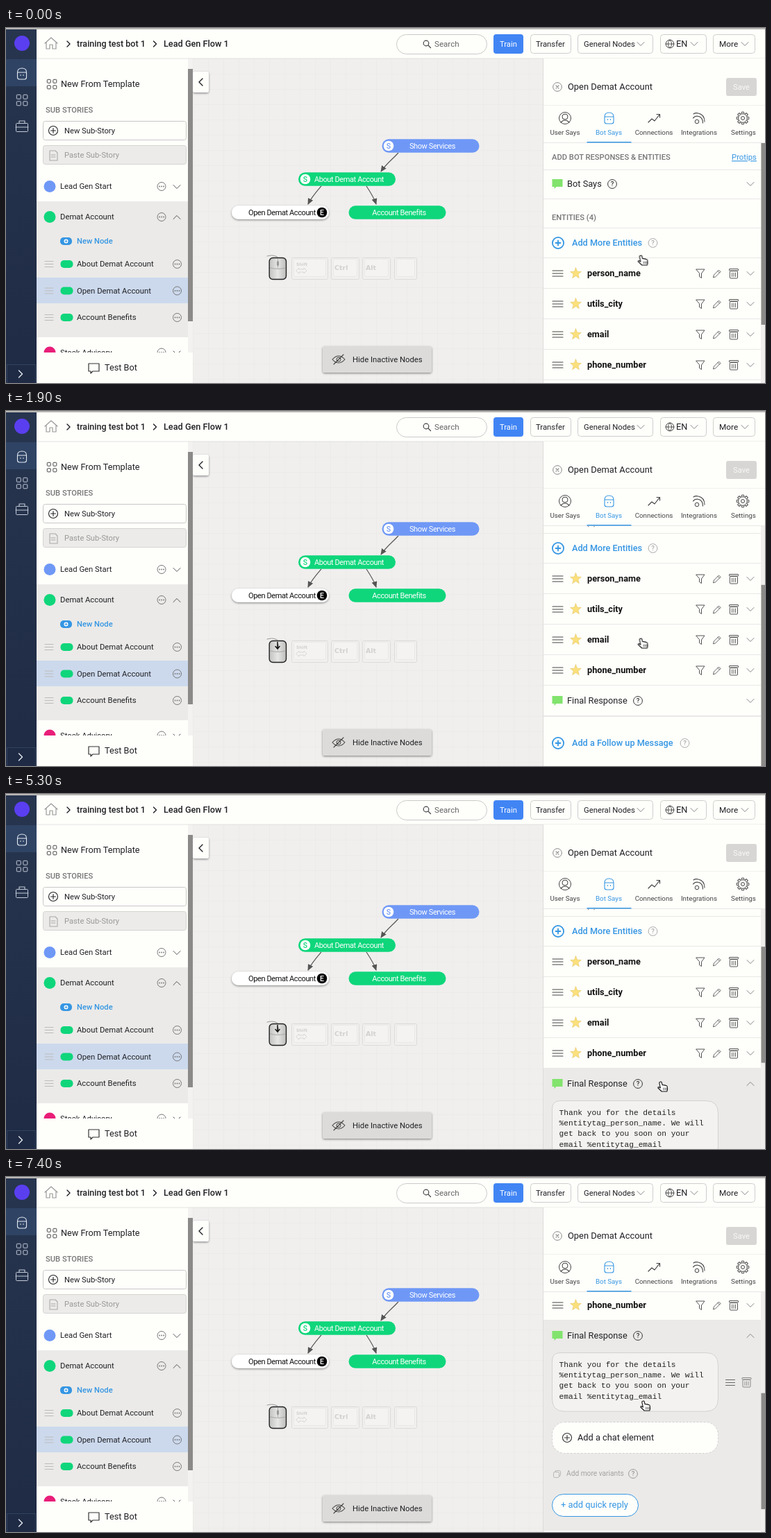
An HTML page that plays this animation: 1093 by 512 pixels, repeating every 8 s.

```html
<!DOCTYPE html>
<html lang="en">
<head>
<meta charset="utf-8">
<title>Bot flow editor</title>
<style>
  html, body { margin: 0; width: 100%; height: 100%; overflow: hidden; background: #fefefb; }
  svg { display: block; width: 1093px; height: 512px; font-family: Roboto, sans-serif; }
  text { white-space: pre; }
  .mono { font-family: "Liberation Mono", monospace; }
  .keys { font-family: "DejaVu Sans", sans-serif; }
  .node { letter-spacing: -.4px; }
</style>
</head>
<body>
<svg id="stage" viewBox="0 0 1093 512" xmlns="http://www.w3.org/2000/svg"></svg>
<script>
const INK = '#202124', LINE = '#e9e8e6', PAPER = '#fefefb', THUMB = '#8b8a89';
const BLUE = '#3596e3', GREEN = '#0fd67b', VIOLET = '#6f98f6';

// Drawing helpers
const rect = (x, y, w, h, fill, r = 0, extra = '') =>
  `<rect x="${x}" y="${y}" width="${w}" height="${h}" rx="${r}" fill="${fill}" ${extra}/>`;
const box = (x, y, w, h, stroke, r = 3, fill = PAPER, extra = '') =>
  rect(x + .5, y + .5, w - 1, h - 1, fill, r, `stroke="${stroke}" ${extra}`);
const disc = (x, y, r, fill, stroke = 'none', w = 1) =>
  `<circle cx="${x}" cy="${y}" r="${r}" fill="${fill}" stroke="${stroke}" stroke-width="${w}"/>`;
const path = (d, stroke = INK, w = 1.1, fill = 'none') =>
  `<path d="${d}" fill="${fill}" stroke="${stroke}" stroke-width="${w}" stroke-linecap="round" stroke-linejoin="round"/>`;
const at = (x, y, content) => `<g transform="translate(${x} ${y})">${content}</g>`;
const group = (id, content) => `<g id="${id}">${content}</g>`;
const text = (x, y, s, size = 11.3, fill = INK, weight = 400, extra = '') =>
  `<text x="${x}" y="${y + size * .335}" font-size="${size}" fill="${fill}" font-weight="${weight}" ${extra}>${s}</text>`;
const label = (x, y, s, size, fill, weight, extra = '') =>
  text(x, y, s, size, fill, weight, 'text-anchor="middle" ' + extra);
const hline = (y, x1 = 774, x2 = 1087) => rect(x1, y, x2 - x1, 1, LINE);

// Icons
const chevron = (x, y, dir = 1, c = '#858584') => path(`M${x - 5} ${y - 2.5 * dir}l5 ${5 * dir} 5 ${-5 * dir}`, c, 1);
const sideChevron = (x, y, dir = 1, c = INK, s = 1) =>
  path(`M${x - 2.5 * dir * s} ${y - 5 * s}l${5 * dir * s} ${5 * s} ${-5 * dir * s} ${5 * s}`, c, 1.4);
const dots = (x, y) => disc(x, y, 6, 'none', '#777') + [-3, 0, 3].map(d => disc(x + d, y, .9, '#777')).join('');
const plus = (x, y, c = INK, r = 6.5, w = 1.1) => disc(x, y, r, 'none', c, w) + path(`M${x - 3.5} ${y}h7M${x} ${y - 3.5}v7`, c, w);
const help = (x, y, c = '#333') => disc(x, y, 6.4, 'none', c, 1) + label(x, y, '?', 9.5, c, 500);
const grip = (x, y, c, w = 15) => path([-4, 0, 4].map(d => `M${x} ${y + d}h${w}`).join(''), c, 1.1);
const tiles = (x, y, c, s = 6) => [[0, 0], [1, 0], [0, 1], [1, 1]].map(([i, j]) =>
  box(x + i * (s + 2.5) - s - 1.2, y + j * (s + 2.5) - s - 1.2, s, s, c, 1, 'none')).join('');
const bubble = (x, y, fill, stroke = 'none') => path(`M${x} ${y}h15v11h-9l-3 3v-3h-3z`, stroke, 1.2, fill);
const star = (x, y) => {
  const pts = Array.from({ length: 10 }, (_, i) => {
    const a = i * Math.PI / 5, r = i % 2 ? 3.5 : 8.2;
    return `${(x + r * Math.sin(a)).toFixed(1)} ${(y - r * Math.cos(a)).toFixed(1)}`;
  });
  return path(`M${pts.join('L')}z`, '#e8cf72', .8, '#fbe07c');
};
const trash = (x, y, c = '#555') => box(x - 6, y - 4, 12, 11.5, c, 1, 'none') + box(x - 7, y - 7, 14, 3.5, c, .5, 'none') +
  path(`M${x - 2.5} ${y - 1}v5.5M${x} ${y - 1}v5.5M${x + 2.5} ${y - 1}v5.5`, c, .9);
const filter = (x, y) => path(`M${x - 6} ${y - 6}h12l-4.5 6v6.5l-3 -2v-4.5z`, '#555', 1);
const pencil = (x, y) => path(`M${x - 5.5} ${y + 5.5}l1 -3.5 7 -7 2.5 2.5 -7 7zM${x + 1} ${y - 3.5}l2.5 2.5`, '#666', 1);
const botIcon = (x, y, c) => path(`M${x - 6.5} ${y - 2}q0 -6 6.5 -6t6.5 6v7q0 3 -3 3h-7q-3 0 -3 -3zh13M${x - 2} ${y + 1.5}v1M${x + 2} ${y + 1.5}v1`, c);

const defs = `<defs>
  <pattern id="grid" x="269" y="44" width="22" height="22" patternUnits="userSpaceOnUse">
    ${rect(0, 0, 22, 22, '#f0efee')}${path('M0 .5H22M.5 0V22', '#ecebea', 1)}</pattern>
  <linearGradient id="metal" x2="1">
    <stop stop-color="#c2c2c1"/><stop offset=".5" stop-color="#e6e6e5"/><stop offset="1" stop-color="#bcbcbb"/></linearGradient>
  <linearGradient id="rail" x2="0" y2="1">
    <stop stop-color="#27354f"/><stop offset="1" stop-color="#1f2b44"/></linearGradient>
  <filter id="soft" x="-20%" y="-50%" width="140%" height="200%">
    <feDropShadow dx="0" dy="1.2" stdDeviation="1.6" flood-opacity=".45"/></filter>
  <marker id="tip" markerWidth="10" markerHeight="8" refX="8" refY="4" orient="auto" markerUnits="userSpaceOnUse">
    <path d="M0 0L9 4L0 8z" fill="#555"/></marker>
  <clipPath id="panelClip"><rect x="774" y="166" width="313" height="346"/></clipPath>
</defs>`;

const nodeArrow = d => `<path d="${d}" fill="none" stroke="#555" stroke-width="1.2" marker-end="url(#tip)"/>`;

function canvasArea() {
  const pill = (x, y, fill, s, cx, ink = '#fff', extra = '') =>
    rect(x, y, 140, 19.5, fill, 9.75, extra) + label(cx, y + 10, s, 11, ink, 400, 'class="node"');
  const badge = (x, y, s, fill, ink) => disc(x, y, 7.3, fill) + label(x, y, s, 10.5, ink, 500);
  const key = (x, w) => box(x, 331, w, 32, '#dcdbda', 2, '#f1f0ef') + box(x + 3, 333, w - 6, 26, '#e9e8e7', 2, '#f4f3f2');
  const keyText = (x, y, s, size) => text(x, y, s, size, '#d2d1d0', 700, 'class="keys"');
  return rect(269, 44, 505, 468, 'url(#grid)')
    + rect(269, 63, 23, 30, PAPER, 3, 'filter="url(#soft)"') + sideChevron(280.5, 78, -1)
    + nodeArrow('M565 180C558 188 548 195 540 207') + nodeArrow('M454 228C448 235 440 244 435 254')
    + nodeArrow('M519 228C525 237 530 245 533 254')
    + pill(541.5, 160.3, VIOLET, 'Show Services', 614) + badge(551, 170, 'S', '#fff', VIOLET)
    + pill(421, 208.3, GREEN, 'About Demat Account', 494) + badge(431, 218, 'S', '#fff', GREEN)
    + pill(325, 256.3, '#fff', 'Open Demat Account', 397.5, '#111', 'filter="url(#soft)"') + badge(455, 266, 'E', '#000', '#fff')
    + pill(493.5, 256.3, GREEN, 'Account Benefits', 566)
    + path('M376 329q7 -2 12 0q3 0 3 3', '#999', 1)
    + rect(379.2, 331.5, 24.3, 31, 'url(#metal)', 5, 'stroke="#222" stroke-width="1.4"')
    + path('M380.5 346q11 3 22 0M391.5 333v13', '#a2a2a1', .9)
    + rect(390, 336, 3, 7, '#999', 1.5)
    + group('press', path('M380.3 345v-8q0 -4 4 -4h6.5v13q-6 0 -10.5 -1z', 'none', 0, '#555'))
    + group('wheel', path('M391 333.5v9M388 339.5l3 3.5 3 -3.5', '#111', 1.5))
    + key(411, 53) + key(468, 41) + key(513, 41) + key(559, 33)
    + keyText(418, 341, 'Shift', 6) + path('M418 350l4 -4v2h7v-2l4 4 -4 4v-2h-7v2z', '#d8d7d6', 1)
    + keyText(473, 346, 'Ctrl', 9.5) + keyText(518, 346, 'Alt', 9.5)
    + rect(456, 459, 157, 38, '#dcdbd9', 3, 'filter="url(#soft)"')
    + path('M470 478q9 -10 18 0q-9 10 -18 0M472 485l14 -14', '#444') + disc(479, 478, 3, 'none', '#444')
    + text(499, 478, 'Hide Inactive Nodes');
}

function sidebar() {
  const story = (y, s, color, dir) => disc(63, y, 8.5, color) + text(78, y, s) + dots(224, y) + chevron(246, y + .5, dir, '#555');
  const item = (y, s) => grip(56, y, '#bbb', 12) + rect(78.5, y - 5.5, 18, 11, GREEN, 5) + text(102, y, s) + dots(246.5, y);
  return rect(44, 44, 225, 468, PAPER) + rect(262, 44, 7, 468, '#f3f2f0') + rect(262, 59, 7, 364, THUMB)
    + tiles(66, 81, '#444', 6) + text(79, 81, 'New From Template', 12.7)
    + text(57, 118, 'SUB STORIES', 11.2, '#777', 500)
    + box(53, 134, 207, 28, '#c9c8c6') + plus(68, 148) + text(84, 148, 'New Sub-Story', 11.2)
    + box(53, 169, 207, 28, '#d4d3d1', 3, '#ecebe9') + path('M63 177h8l3 3v11h-11zM65 183h6M65 186h6', '#aaa') + text(84, 183, 'Paste Sub-Story', 11.2, '#999')
    + story(228.5, 'Lead Gen Start', VIOLET, 1)
    + rect(44, 250, 218, 196, '#ebeae8') + rect(44, 360, 218, 37, '#ccd9ed')
    + story(272.5, 'Demat Account', GREEN, -1)
    + rect(78, 302, 17, 11, BLUE, 5) + disc(86.5, 307.5, 3, '#fff') + path('M85 307.5h3M86.5 306v3', BLUE, 1)
    + text(102, 307, 'New Node', 11.2, BLUE, 500)
    + item(340.5, 'About Demat Account') + item(379, 'Open Demat Account') + item(417.5, 'Account Benefits')
    + story(468, 'Stock Advisory', '#e91e79', 1)
    + rect(44, 468, 225, 44, PAPER) + bubble(119, 484, 'none', '#333') + text(142, 490, 'Test Bot', 12.7);
}

function header() {
  const button = (x, w, s, tx, size) => box(x, 9, w, 28, '#cfcecc', 4) + text(tx, 23, s, size);
  return rect(44, 0, 1049, 44, PAPER) + rect(44, 43.5, 1049, 1, '#e4e3e1') + rect(0, 0, 1093, 2, '#b9b7b5')
    + path('M56 22l9 -8 9 8M58 21v9h5v-6h4v6h5v-9', '#999', 1.2)
    + sideChevron(90, 23, 1, INK, .8) + text(102, 23, 'training test bot 1', 12.5, INK, 500)
    + sideChevron(214.5, 23, 1, INK, .8) + text(227, 23, 'Lead Gen Flow 1', 12.7, INK, 500)
    + box(562, 9, 131, 29, '#cbcac8', 14) + disc(605, 22, 3.8, 'none', '#444', 1.2) + path('M608 25l3.5 3.5', '#444', 1.2)
    + text(617, 23, 'Search', 11.6, '#666')
    + rect(702, 9, 43, 28, '#4185f4', 4) + text(711, 23, 'Train', 11.2, '#fff')
    + button(755, 59, 'Transfer', 763) + button(823, 109, 'General Nodes', 832) + chevron(914, 23)
    + button(942, 67, 'EN', 965, 12.8) + disc(956, 23, 5.8, 'none', '#444')
    + path('M950 23h12M956 17q-5.500 6 0 12q5.500 -6 0 -12', '#444', .9) + chevron(991, 23)
    + button(1018, 61, 'More', 1027, 11.8) + chevron(1064, 23);
}

function navRail() {
  const pale = '#c3cbd8';
  return rect(0, 2, 44, 510, 'url(#rail)') + rect(0, 45, 44, 39, '#2f4364')
    + disc(23, 22, 11, '#5a3ff0')
    + botIcon(23, 66, '#e5eaf2') + tiles(23, 104, pale, 7)
    + box(14, 137, 18, 13, pale, 1, 'none') + path('M19 137v-3h8v3M14 143h18', pale)
    + box(1, 485, 42, 28, '#31425e', 0, '#1f2b44') + sideChevron(21, 499, 1, '#e5eaf2');
}

function panelTop() {
  const tab = (x, s, c = '#444') => label(x, 151, s, 9.8, c);
  const cog = Array.from({ length: 8 }, (_, i) => `<path d="M-2 -6.5l.5 -2.3h3l.5 2.3" transform="rotate(${i * 45})" fill="none" stroke="#444"/>`).join('');
  return rect(774, 44, 319, 122, PAPER) + rect(773, 44, 1, 468, '#dcdbd9')
    + disc(794, 85, 6.3, 'none', '#888') + path('M792 83l4 4M796 83l-4 4', '#888')
    + text(809, 85, 'Open Demat Account', 12.9)
    + rect(1037, 72, 44, 26, '#d7d6d4', 3) + label(1059, 85, 'Save', 11.2, '#f8f7f5')
    + rect(774, 111, 319, 1, '#f1f0ee')
    + disc(805, 130, 8.5, 'none', '#444') + disc(805, 128, 4, 'none', '#444') + path('M799 136q6 -6 12 0', '#444')
    + botIcon(868.5, 130, BLUE)
    + path('M925 136l5 -5 4 3 7 -9M937 124.5h4.5v4.5', '#444', 1.2)
    + disc(995, 135, 2.8, 'none', '#444') + path('M989.5 130q2 -3 6 -3q8 1 8 10M990 124q3 -2 7 -1q9 2 9 12', '#444')
    + at(1061, 130, cog + disc(0, 0, 6.3, 'none', '#444') + disc(0, 0, 2.5, 'none', '#444'))
    + tab(805, 'User Says') + tab(868, 'Bot Says', BLUE) + tab(933, 'Connections') + tab(998, 'Integrations') + tab(1062, 'Settings')
    + rect(774, 165, 319, 1, LINE) + rect(836.5, 164, 64, 1.5, BLUE);
}

function panelContent() {
  const entity = (name, i) => {
    const y = 354 + i * 44;
    return grip(787, y, '#444') + star(820.5, y) + text(837, y, name, 12.7, '#111', 700)
      + filter(1000, y) + pencil(1024, y) + trash(1048, y) + chevron(1072, y) + hline(y + 21);
  };
  const message = ['Thank you for the details', '%entitytag_person_name. We will', 'get back to you soon on your', 'email %entitytag_email'];
  const addLink = (y, s, hx) => plus(795, y, BLUE, 8.1, 1.8) + text(815, y, s, 12.7, BLUE, 500) + help(hx, y, '#aaa');
  const reply = rect(774, 551, 313, 260, '#ebeae8')
    + path('M798 554.5H1008q17.5 0 17.5 18V621q0 18 -18 18H804q-17.5 0 -17.5 -18V566q0 -11.5 11.5 -11.5z', '#d3d2d0', 1, '#f3f2f0')
    + message.map((s, i) => text(796.5, 571 + i * 15.3, s, 11.2, '#222', 400, 'class="mono"')).join('')
    + group('tools', grip(1036.5, 597.5, '#666', 13) + trash(1066.5, 597, '#888'))
    + box(786, 654, 240, 46, '#d3d2d0', 18, PAPER, 'stroke-dasharray="3 2"') + plus(808, 677, '#333') + text(823, 677, 'Add a chat element', 12.8)
    + box(790, 724, 9, 9, '#b5b4b2', 2, 'none') + box(788, 726, 9, 9, '#b5b4b2', 2, '#ebeae8')
    + text(807, 729, 'Add more variants', 10.2, '#a3a2a0') + help(903, 729, '#999')
    + box(786, 758, 125, 33, BLUE, 16) + text(799, 774, '+ add quick reply', 12.9, BLUE);
  const below = rect(774, 552, 313, 460, PAPER) + hline(552) + addLink(591, 'Add a Follow up Message', 977.5);
  return rect(774, 166, 313, 400, PAPER)
    + text(786, 186.5, 'ADD BOT RESPONSES &amp; ENTITIES', 11.2, '#777', 500)
    + text(1045, 186.5, 'Protips', 11.3, BLUE, 400, 'text-decoration="underline"') + hline(204)
    + bubble(786.5, 218, '#82e36d') + text(808, 225, 'Bot Says', 12.8) + help(873, 225) + chevron(1072, 225) + hline(246)
    + text(786, 273, 'ENTITIES (4)', 11.2, '#777', 500) + hline(288)
    + addLink(310, 'Add More Entities', 931.5) + hline(331)
    + ['person_name', 'utils_city', 'email', 'phone_number'].map(entity).join('')
    + reply + group('closedRow', chevron(1072, 530))
    + group('openRow', rect(774, 508, 313, 45, '#ebeae8') + chevron(1072, 530, -1))
    + bubble(786.5, 523, '#82e36d') + text(808, 530, 'Final Response', 12.8) + help(910, 530)
    + group('below', below);
}

const hand = path('M-4 -6.8q1.6 -.8 2.2 .8l1 3.8q1.6 -.8 2.4 .3q1.6 -.6 2.2 .5q2 -.3 2.4 1.2q.9 3.8 -.4 7.2h-7.6l-5.2 -5q-.5 -1.6 1.4 -1.3l2 1.3l-1.6 -7.2q-.2 -1.2 1.2 -1.6z', '#111', 1.1, '#fff')
  + path('M.8 2v2.800M3 2v2.800M5 2v2.800', '#111', .7);

document.getElementById('stage').innerHTML = defs + canvasArea() + sidebar() + header() + navRail()
  + `<g clip-path="url(#panelClip)">${group('scroller', panelContent())}</g>` + panelTop()
  + rect(1087, 166, 6, 346, '#efeeec') + rect(1087.5, 166, 5.5, 262, THUMB, 0, 'id="thumb"')
  + group('cursor', hand);

// Motion: every table row is [time, ...values], held until the next row
const LOOP = 8000;
function play(id, rows, style) {
  const frames = rows.map(([t, ...v]) => ({ offset: t / LOOP, easing: 'step-end', ...style(...v) }));
  frames.push({ ...frames[frames.length - 1], offset: 1 });
  document.getElementById(id).animate(frames, { duration: LOOP, iterations: Infinity });
}
const move = (x, y) => ({ transform: `translate(${x}px, ${y}px)` });
const show = on => ({ opacity: on });

// time, scroll offset, opened height of the reply section
const VIEW = 346;
const panel = [[0, 0, 0],
  [1300, 10, 0], [1400, 34, 0], [1500, 64, 0], [1600, 89, 0], [1700, 102, 0], [1800, 109, 0], [1900, 112, 0],
  [4200, 112, 100], [4300, 112, 205], [4400, 112, 258],
  [5400, 136, 258], [5500, 182, 258], [5600, 232, 258], [5700, 271, 258], [5800, 286, 258],
  [5900, 295, 258], [6000, 299, 258], [6100, 301, 258]];
play('scroller', panel, y => move(0, -y));
play('below', panel, (y, open) => move(0, open));
play('openRow', panel, (y, open) => show(open ? 1 : 0));
play('closedRow', panel, (y, open) => show(open ? 0 : 1));
play('thumb', panel, (y, open) => {
  const ratio = VIEW / (457 + open);
  return { y: `${166 + y * ratio}px`, height: `${VIEW * ratio}px` };
});

play('wheel', [[0, 0], [1300, 1], [2200, 0], [5300, 1], [6100, 0]], show);
play('press', [[0, 0], [4100, 1], [4500, 0]], show);
play('tools', [[0, 0], [7100, 1]], show);
play('cursor', [[0, 917.5, 335], [2800, 912, 385], [2900, 908, 419],
  [3100, 907, 419], [3200, 911, 419], [3300, 919, 420], [3400, 928, 421], [3500, 937, 422], [3600, 943, 422], [3700, 946, 422],
  [6400, 905, 394], [6500, 875, 371], [6700, 872, 370], [6800, 874, 368], [6900, 881, 361], [7000, 891, 352],
  [7100, 902, 343], [7200, 911, 336], [7300, 918, 332], [7400, 921, 330]], move);
</script>
</body>
</html>
```
